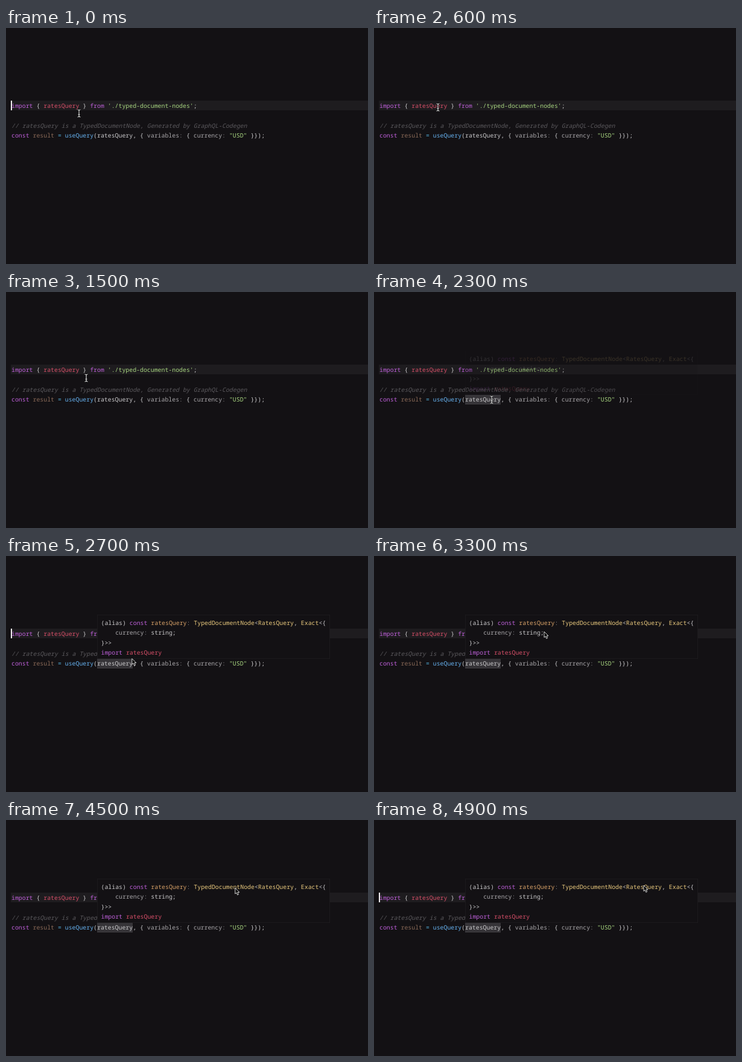
An HTML page that plays this animation: 600 px wide and 390 px high, repeating every 5 s.

```html
<!DOCTYPE html>
<html lang="en">
<head>
<meta charset="utf-8">
<title>Typed query hover</title>
<style>
  html, body { margin: 0; width: 100%; height: 100%; overflow: hidden; background: #131114; }
  body { position: relative; }
  body > * { position: absolute; left: 0; top: 0; }
  pre {
    margin: 0; color: #c9c8ca;
    font: 500 9.87px/16.4px "Noto Sans Mono", "DejaVu Sans Mono", monospace;
    text-rendering: geometricPrecision; font-variant-ligatures: none;
  }
  #row { left: 8px; top: 120px; right: 0; height: 16px; background: #1e1c1f; }
  #mark { width: 59px; height: 16px; background: #363438; }
  #code { left: 9px; top: 120px; }
  #caret { left: 8px; top: 120px; width: 2px; height: 16px; background: #f3eef3; }
  #tip {
    box-sizing: border-box; width: 386px; height: 73px; padding: 4px 0 0 5.5px;
    background: #131114; border: 1px solid #1c1a1d;
  }
  svg { overflow: visible; }
  .key { color: #bf60da; }
  .red { color: #d64f68; }
  .str { color: #a8d680; }
  .note { color: #5b595d; font-style: italic; font-weight: 400; }
  .var { color: #8b6a58; }
  .op { color: #52b0dc; }
  .fn { color: #66b1ee; }
  .prop { color: #a9a7aa; }
  .dim { color: #7f7d80; }
  .name { color: #d6a067; }
  .type { color: #e8c87d; }
</style>
</head>
<body>
<div id="row"></div>
<div id="mark"></div>
<pre id="code"><span class="key">import</span> { <span class="red">ratesQuery</span> } <span class="key">from</span> <span class="str">'./typed-document-nodes'</span>;

<span class="note">// ratesQuery is a TypedDocumentNode, Generated by GraphQL-Codegen</span>
<span class="key">const</span> <span class="var">result</span> <span class="op">=</span> <span class="fn">useQuery</span>(ratesQuery, { <span class="prop">variables</span><span class="dim">:</span> { <span class="prop">currency</span><span class="dim">:</span> <span class="str">"USD"</span> }});</pre>
<div id="caret"></div>
<pre id="tip">(alias) <span class="key">const</span> <span class="name">ratesQuery</span><span class="dim">:</span> <span class="type">TypedDocumentNode</span>&lt;<span class="type">RatesQuery</span>, <span class="type">Exact</span>&lt;{
    <span class="prop">currency</span><span class="dim">:</span> string;
}&gt;&gt;
<span class="key">import</span> <span class="red">ratesQuery</span></pre>
<svg id="pointer" width="1" height="1">
  <defs>
    <path id="stem" fill="none" d="M-2.5-6Q0-6 0-4.5Q0-6 2.5-6M0-4.5V4.5M-2.5 6Q0 6 0 4.5Q0 6 2.5 6M-1.5 2H1.5"/>
  </defs>
  <g id="beam">
    <use href="#stem" stroke="#000" stroke-width="2.4"/>
    <use href="#stem" stroke="#eee" stroke-width="1.1"/>
  </g>
  <path id="arrow" d="M0 0V9.6L2.2 7.6L3.8 11.4L5.6 10.6L4 7H7Z" fill="#000" stroke="#eee" stroke-width=".9"/>
</svg>
<script>
const LOOP = 5000, FADE = 120;
// Pointer stops: time, x, y
const stops = [
  [0, 121, 141], [500, 106, 131], [1250, 106, 131], [1500, 133, 142],
  [1800, 180, 170], [2000, 195, 178], [2600, 195, 178], [3000, 282, 125],
  [3300, 282, 125], [4000, 356, 114], [4300, 356, 114], [4900, 447, 108], [LOOP, 447, 108]
];
// Hovers: time range, tooltip corner, highlighted word corner
const hovers = [
  { from: 800, to: 1350, tip: [62, 47], word: [62, 120] },
  { from: 2280, to: LOOP, tip: [151, 97], word: [151, 170] }
];
const el = id => document.getElementById(id);
const show = (id, on) => el(id).style.visibility = on ? "visible" : "hidden";
const place = (id, [x, y]) => el(id).style.transform = `translate(${x}px, ${y}px)`;

function pointerAt(t) {
  const i = stops.findIndex(s => s[0] > t);
  const [t0, x0, y0] = stops[i - 1], [t1, x1, y1] = stops[i];
  const p = (t - t0) / (t1 - t0), e = p * p * (3 - 2 * p);
  return [x0 + (x1 - x0) * e, y0 + (y1 - y0) * e];
}

function draw(t) {
  const hover = hovers.find(h => t >= h.from && t < h.to);
  show("mark", hover);
  show("tip", hover);
  if (hover) {
    place("mark", hover.word);
    place("tip", hover.tip);
    el("tip").style.opacity = Math.min(1, (t - hover.from) / FADE);
  }
  show("caret", (t + 300) % 1000 < 500);
  const spot = pointerAt(t), overTip = t > 2400 && spot[1] < 170;
  place("pointer", spot);
  show("arrow", overTip);
  show("beam", !overTip);
}

const start = performance.now();
function tick() {
  draw((performance.now() - start) % LOOP);
  requestAnimationFrame(tick);
}
tick();
</script>
</body>
</html>
```
